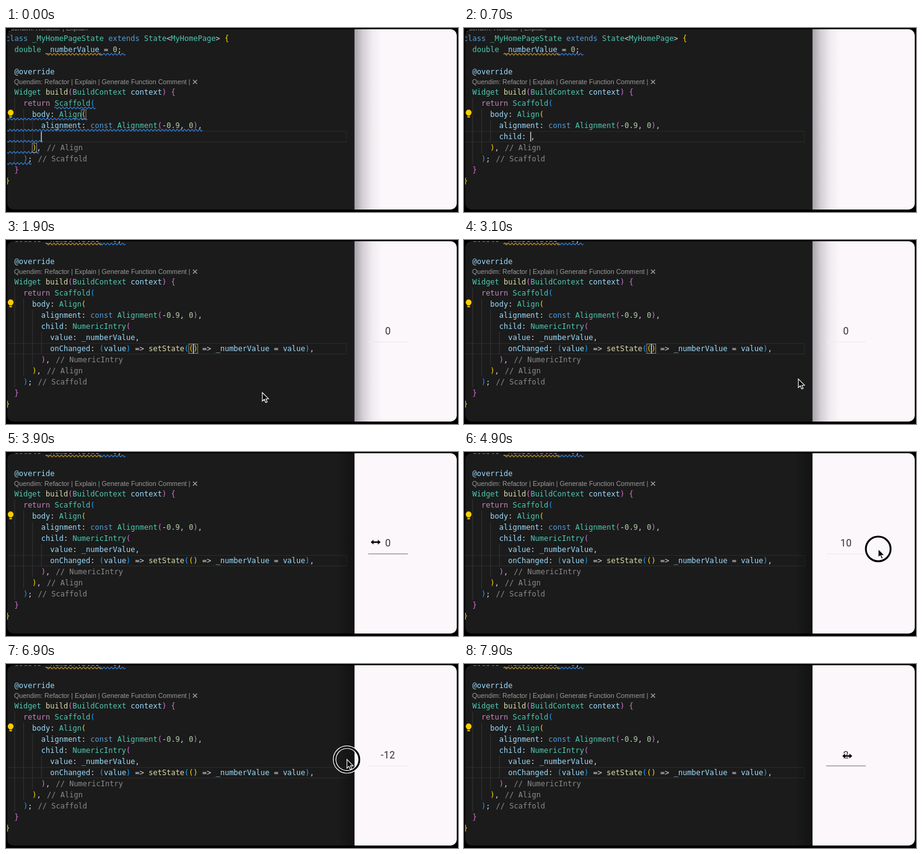
Recreate the animation shown at these times as an HTML page. Size 730 by 298 pixels, loop 8000 ms.

```html
<!DOCTYPE html>
<html lang="en">
<head>
<meta charset="utf-8">
<title>Numeric entry demo</title>
<style>
  html, body { margin: 0; width: 100%; height: 100%; overflow: hidden; background: #000; }
  svg { display: block; width: 730px; height: 298px; }
  text { white-space: pre; }
  .mono text { font: 12px "DejaVu Sans Mono", monospace; }
  .lens, .mono .lens { font: 10.65px "Liberation Sans", sans-serif; fill: #999; }
  .num { font: 16px Roboto, sans-serif; letter-spacing: .3px; fill: #333136; text-anchor: middle; }
</style>
</head>
<body>
<svg viewBox="0 0 730 298">
  <defs>
    <clipPath id="frame"><rect x="2" y="2" width="726" height="292" rx="10"/></clipPath>
    <linearGradient id="shade">
      <stop offset="0" stop-color="#55505a" stop-opacity=".5"/>
      <stop offset=".3" stop-color="#55505a" stop-opacity=".24"/>
      <stop offset=".65" stop-color="#55505a" stop-opacity=".07"/>
      <stop offset="1" stop-color="#55505a" stop-opacity="0"/>
    </linearGradient>
    <linearGradient id="dim">
      <stop offset="0" stop-color="#000" stop-opacity="0"/>
      <stop offset="1" stop-color="#000" stop-opacity=".35"/>
    </linearGradient>
  </defs>
  <rect width="730" height="298"/>
  <g clip-path="url(#frame)">
    <rect width="563" height="298" fill="#1b1b1b"/>
    <g id="code" class="mono"></g>
    <g id="popup" class="mono"></g>
    <rect id="edge" x="535" width="28" height="298" fill="url(#dim)"/>
    <rect x="562" width="168" height="298" fill="#333"/>
    <rect x="563" width="167" height="298" fill="#fcf7fb"/>
    <rect id="cast" x="563" width="44" height="298" fill="url(#shade)"/>
    <g id="field">
      <path id="rule" d="M585 165H649" stroke-width="1.6"/>
      <text id="num" class="num" x="617" y="152.5"></text>
    </g>
    <g id="pointer">
      <g id="ring" fill="none">
        <circle r="20" stroke="#fff" stroke-width="5.4"/>
        <circle r="20" stroke="#000" stroke-width="3"/>
      </g>
      <path id="arrow" d="M0 0V14L3.2 11L5.4 16.2L7.8 15.2L5.6 10.2H10Z" stroke="#fff" stroke-width="1.1"/>
      <path id="resize" d="M-8 0L-3.5 -4V-1.3H3.5V-4L8 0L3.5 4V1.3H-3.5V4Z" stroke="#fff" stroke-width="1" paint-order="stroke"/>
    </g>
  </g>
</svg>
<script>
const $ = id => document.getElementById(id);
const LOOP = 8000, CW = 7.224, X0 = -1;
const BLUE = '#569cd6', TEAL = '#4ec9b0', VAR = '#9cdcfe', FUNC = '#dcdcaa',
  PLAIN = '#d4d4d4', NOTE = '#8a8a8a', RED = '#f14c4c', INFO = '#3794ff', WARN = '#d7a534';
const BRACKETS = ['#ffd700', '#da70d6', '#179fff'];

const colX = c => X0 + c * CW;
const midY = i => i < 4 ? 17 + 18 * i : 104 + 18 * (i - 4);
const esc = s => s.replace(/&/g, '&amp;').replace(/</g, '&lt;').replace(/>/g, '&gt;');
const span = (s, fill, dx = 0) => `<tspan fill="${fill}"${dx ? ` dx="${dx}"` : ''}>${esc(s)}</tspan>`;

function wordColor(w) {
  if (/^(class|extends|const)$/.test(w)) return BLUE;
  if (w === 'return') return '#c586c0';
  if (/^(build|setState)$/.test(w)) return FUNC;
  if (/^(double|_?[A-Z]\w*)$/.test(w)) return TEAL;
  if (/^\d/.test(w)) return '#b5cea8';
  return VAR;
}

function paint(line, state) {
  return (line.match(/\/\/.*|@?\w+(?:\.\d+)?|\s+|./g) || []).map(tok => {
    if (tok.startsWith('//')) return span(tok, NOTE, 2);
    if (/[({]/.test(tok)) return span(tok, BRACKETS[state.depth++ % 3]);
    if (/[)}]/.test(tok)) return span(tok, BRACKETS[--state.depth % 3]);
    return span(tok, /^[@\w]/.test(tok) ? wordColor(tok) : PLAIN);
  }).join('');
}

function wave(row, from, to, color) {
  const x = colX(from), n = Math.ceil((to - from) * CW / 6);
  return `<path d="M${x} ${midY(row) + 7.5}${'q1.5 -3 3 0t3 0'.repeat(n)}" fill="none" stroke="${color}" stroke-width="1.1"/>`;
}

const box = (row, col) =>
  `<rect x="${colX(col)}" y="${midY(row) - 7.5}" width="7.2" height="15" fill="none" stroke="#888"/>`;

const lens = (x, y, s) => `<text class="lens" x="${x}" y="${y}">${s}</text>`;

const head = [
  'class _MyHomePageState extends State<MyHomePage> {',
  '  double _numberValue = 0;', '', '  @override',
  '  Widget build(BuildContext context) {',
  '    return Scaffold(', '      body: Align(',
  '        alignment: const Alignment(-0.9, 0),'];
const tail = ['      ), // Align', '    ); // Scaffold', '  }', '}'];
const entry = s => ['        ' + s];
const nested = s => ['        child: NumericIntry(', '          value: _numberValue,',
  '          ' + s, '        ), // NumericIntry'];

// Each stage: start time, edited lines, extras
const stages = [
  { at: 0, body: entry(''), caret: 8, todo: true, boxes: [[6, 17], [9, 6]] },
  { at: 500, body: entry('ch'), caret: 10 },
  { at: 700, body: entry('child: ,'), caret: 15 },
  { at: 900, body: entry('child: Numeric,'), caret: 22, bad: [[15, 22]] },
  { at: 1100, body: entry('child: NumericIntry()'), caret: 28, bad: [[15, 27]], boxes: [[8, 27], [8, 28]] },
  { at: 1300, body: entry('child: NumericIntry(value: ,)'), bad: [[15, 27], [35, 36]], boxes: [[8, 27]], list: true },
  { at: 1500, body: entry('child: NumericIntry(value: _numberValue,)'), caret: 48, bad: [[15, 27]] },
  { at: 1700, body: nested('onChanged: (value) => ,'), caret: 32, row: 10, up: 36 },
  { at: 1900, body: nested('onChanged: (value) => setState(() => _numberValue = value),'),
    caret: 42, row: 10, up: 36, boxes: [[10, 41], [10, 42]] },
  { at: 3500, body: nested('onChanged: (value) => setState(() => _numberValue = value),'), row: 10, up: 36 }
];

function drawCode(s) {
  const lines = [...head, ...s.body, ...tail], row = s.row || 8, state = { depth: 0 };
  let out = `<rect x="-2" y="${midY(row) - 8.5}" width="552" height="17" fill="none" stroke="#2a2a2a"/>`;
  lines.forEach((line, i) => {
    const indent = line.trim() ? line.search(/\S/) : i === 8 ? 8 : 0;
    for (let c = 2; c < indent; c += 2)
      out += `<path d="M${colX(c) + .5} ${midY(i) - 9}v18" stroke="#363636"/>`;
    out += `<text x="${X0}" y="${midY(i) + 4}">${paint(line, state)}</text>`;
  });
  out += lens(X0, 3.5, 'Quendim: Refactor | Explain');
  out += lens(13, 91, 'Quendim: Refactor | Explain | Generate Function Comment |');
  out += '<path d="M302 84l6.5 6.5m0 -6.5l-6.5 6.5" stroke="#aaa" stroke-width="1.1"/>';
  out += wave(1, 9, 21, WARN) + wave(1, 21, 26, INFO);
  if (s.todo) {
    out += wave(5, 11, 20, INFO);
    [[6, 18], [7, 44], [8, 8], [9, 7], [10, 5]].forEach(([r, end]) => out += wave(r, 0, end, INFO));
  }
  (s.bad || []).forEach(([a, b]) => out += wave(8, a, b, RED));
  (s.boxes || []).forEach(([r, c]) => out += box(r, c));
  if (s.caret) out += `<rect x="${colX(s.caret) - .4}" y="${midY(row) - 8}" width="1.4" height="16" fill="#ccc"/>`;
  out += '<circle cx="7.5" cy="137" r="4.7" fill="#fc0"/><path d="M5.5 141h4v4h-4z" fill="#fc0"/><path d="M5.5 142.5h4" stroke="#1b1b1b"/>';
  $('code').innerHTML = out;
  $('code').setAttribute('transform', `translate(0 ${-(s.up || 0)})`);
  $('popup').style.display = s.list ? '' : 'none';
}

function drawPopup() {
  const items = ['double', '_numberValue', 'BorderSide.strokeAlignCenter', 'BorderSide.strokeAlignInside',
    'BorderSide.strokeAlignOutside', 'BouncingScrollSimulation.maxSpringTransferVelocity'];
  let out = '<rect x="102.5" y="185.5" width="410" height="120" fill="#202020" stroke="#454545"/>' +
    '<rect x="103" y="186" width="409" height="18" fill="#04395e"/>';
  items.forEach((s, i) => {
    const y = 195 + 18 * i;
    const note = i === 0 ? '' : i === 5 ? '…' : 'double';
    out += i ? `<path transform="translate(112 ${y})" d="M-6 -1.5L1 -5L6 -2.5V2L-1 5.5L-6 3ZM-6 -1.5L-1 1L6 -2.5M-1 1V5.5" fill="none" stroke="#75beff" stroke-width="1.1"/>`
      : `<path transform="translate(112 ${y})" d="M-6 -1L-2.5 -4.5L0 -2L-3.5 1.5ZM-1 -1H3M1 -1V4H3M3 -1L5 -3L7 -1L5 1ZM3 4L5 2L7 4L5 6Z" fill="none" stroke="#ddd" stroke-width="1.1"/>`;
    out += `<text x="124" y="${y + 4}">${span(s, i ? '#ccc' : '#fff')}${note && span(note, '#999', 6)}</text>`;
  });
  $('popup').innerHTML = out;
}

// Pointer path: time, x, y
const path = [
  [1900, 414, 247], [2700, 414, 247], [2900, 450, 242], [3100, 540, 225], [3300, 622, 207],
  [3500, 624, 206], [3700, 612, 172], [3900, 597, 146], [4300, 616, 150], [4900, 669, 157],
  [5100, 673, 159], [5300, 672, 159], [5500, 630, 158], [5900, 489, 156], [6100, 462, 156],
  [6300, 455, 156], [6500, 472, 156], [7100, 590, 154], [7300, 618, 153], [7500, 627, 152], [7900, 619, 149]];

function pointerAt(t) {
  const i = Math.max(1, path.findIndex(p => p[0] >= t));
  const [a, b] = [path[i - 1], path[i]];
  const k = Math.max(0, (t - a[0]) / (b[0] - a[0]));
  return [a[1] + (b[1] - a[1]) * k, a[2] + (b[2] - a[2]) * k];
}

const show = (id, on) => $(id).style.display = on ? '' : 'none';
const valueAt = x => Math.round((x - 616) * .189) || 0;
let stage, last;

function render(time) {
  const t = time < 500 ? 0 : 500 + Math.floor((time - 500) / 200) * 200;
  if (t === last) return;
  last = t;
  const now = stages.filter(s => s.at <= t).pop();
  if (now !== stage) drawCode(stage = now);

  const [x, y] = pointerAt(t);
  const drag = t >= 4300 && t <= 7500, hover = !drag && t >= 3900;
  show('pointer', t >= 1900);
  show('ring', drag);
  show('arrow', !hover);
  show('resize', hover);
  $('pointer').setAttribute('transform', `translate(${x} ${y})`);

  show('cast', t < 3500);
  show('edge', t >= 3500);
  show('field', t >= 1900);
  $('rule').setAttribute('stroke', hover ? '#a19da2' : '#f1ebf0');
  $('num').textContent = t < 4300 ? 0 : valueAt(t > 7500 ? 627 : x);
}

drawPopup();
const start = performance.now();
function tick() {
  render((performance.now() - start) % LOOP);
  requestAnimationFrame(tick);
}
tick();
</script>
</body>
</html>
```
